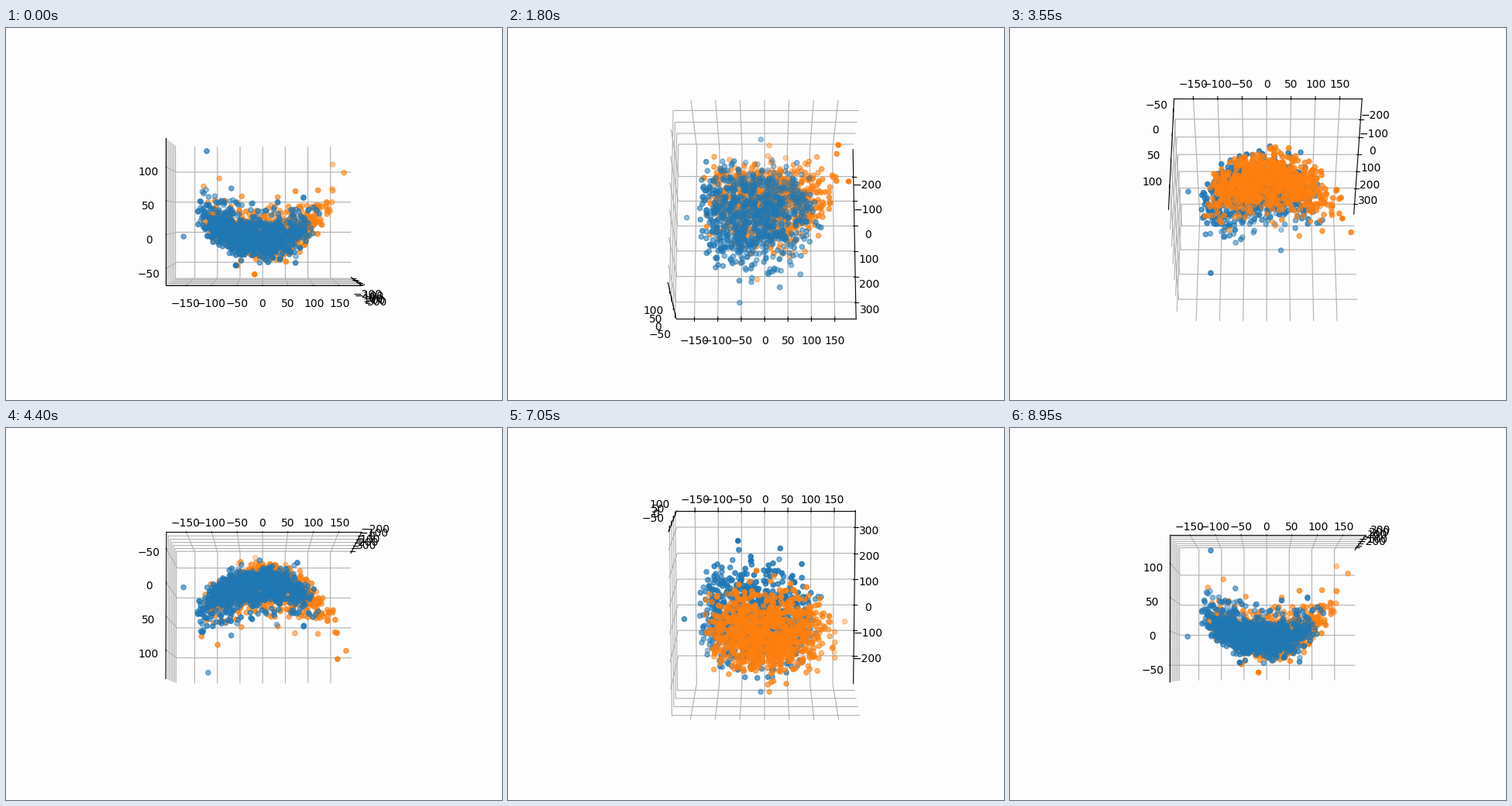
A matplotlib script that plays this animation: 640x480 px, repeating every 9000 ms.

```python
import numpy as np
import matplotlib.pyplot as plt
from matplotlib.animation import FuncAnimation

FRAMES, INTERVAL, COUNT = 180, 50, 850
PAPER = "#fdfdfd"
rng = np.random.default_rng(12)


def spread(low, high, a, b):
    """Random values between two ends, peaked according to a and b."""
    return low + (high - low) * rng.beta(a, b, COUNT)


def bowl(x, z):
    """Give x and z a rounded outline and lift the sides into a bowl."""
    t = (x - x.mean()) / np.ptp(x) * 2
    z = z.mean() + (z - z.mean()) * np.sqrt(1 - 0.5 * np.clip(t**2, 0, 1))
    noise = rng.normal(0, 10, COUNT) + rng.gumbel(0, 10, COUNT)
    y = 0.0026 * x**2 - 0.05 * z - 14 + noise
    return np.column_stack([x, y, z])


# Outermost points of each cloud; the nearer one puts its cloud on top
blue_tips = [(-115, 128, 103), (-165, -5, 19), (-53, -46, 320), (-8, 21, -268)]
orange_tips = [(151, 111, -168), (172, 96, -42), (-16, -61, 220), (10, 5, -258)]

blue = bowl(spread(-145, 135, 2.2, 2.9), spread(-220, 335, 3, 4.2))
orange = bowl(spread(-132, 165, 2.5, 2.8), spread(-250, 225, 3.6, 4.4))

fig = plt.figure(figsize=(6.4, 4.8), dpi=100, facecolor=PAPER)
ax = fig.add_subplot(projection="3d", facecolor=PAPER)
ax.scatter(*np.vstack([blue, blue_tips]).T, color="C0")
ax.scatter(*np.vstack([orange, orange_tips]).T, color="C1")

ax.set_xticks(range(-150, 151, 50))
ax.set_yticks(range(-50, 101, 50))
ax.set_zticks(range(-200, 301, 100))
ax.set_xlim(-189.3, 195.5)
ax.set_ylim(-75, 142.3)
ax.set_zlim(-311, 363)
for axis in (ax.xaxis, ax.yaxis, ax.zaxis):
    axis.set_pane_color((1, 1, 1, 0))


def update(i):
    elev = 360 * i / FRAMES
    a = np.deg2rad(elev)
    # Tiny offsets keep the choice of back panes stable at right angles
    elev += 1e-3 * (np.cos(a) - np.sin(a))
    azim = 1e-6 * np.sign(np.cos(np.deg2rad(elev)))
    ax.view_init(elev=elev, azim=azim, vertical_axis="y")
    return []


anim = FuncAnimation(fig, update, frames=FRAMES, interval=INTERVAL,
                     init_func=lambda: update(0), repeat=True,
                     repeat_delay=0, blit=False)
plt.show()
```
